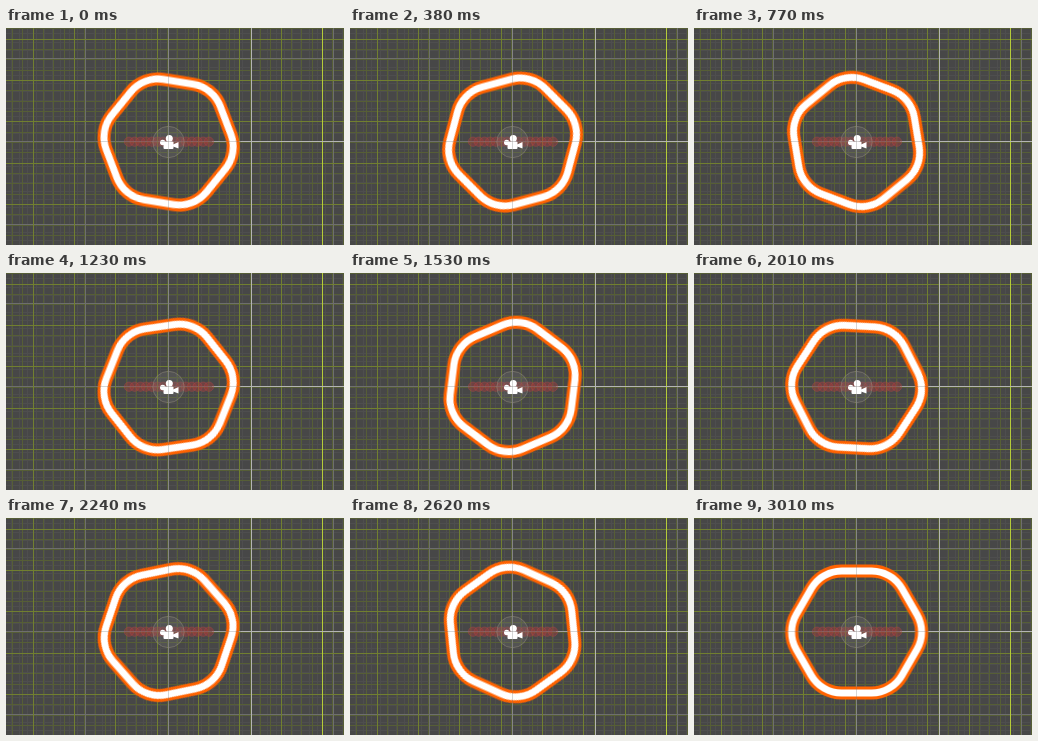
An HTML page for the animation above (3080 ms loop, 338 by 217 pixels).

```html
<!DOCTYPE html>
<html lang="en">
<head>
<meta charset="utf-8">
<title>Rotating hexagon</title>
<style>
html, body { margin: 0; width: 100%; height: 100%; overflow: hidden; background: #474747; }
svg { display: block; width: 338px; height: 217px; }
.ring {
  fill: none;
  /* the small lead keeps every step on a 10 ms clock */
  animation: spin 3080ms steps(40) -7ms infinite;
}
@keyframes spin {
  from { transform: rotate(9.2deg); }
  to { transform: rotate(-184.8deg); }
}
</style>
</head>
<body>
<svg viewBox="0 0 338 217">
  <defs>
    <path id="hex" d="M60.31-17.5A35 35 0 0 1 60.31 17.5L45.31 43.48A35 35 0 0 1 15 60.98H-15A35 35 0 0 1-45.31 43.48L-60.31 17.5A35 35 0 0 1-60.31-17.5L-45.31-43.48A35 35 0 0 1-15-60.98H15A35 35 0 0 1 45.31-43.48Z"/>
  </defs>
  <g id="grid" shape-rendering="crispEdges"></g>
  <g id="bar" fill="#a83c3c" fill-opacity=".42" stroke="#c04848" stroke-opacity=".4" stroke-width=".8"></g>
  <circle cx="162.5" cy="114" r="15.7" fill="#777" fill-opacity=".25" stroke="#99917f" stroke-opacity=".6" stroke-width=".8"/>
  <g fill="#fff">
    <circle cx="163.3" cy="110.5" r="3.5"/>
    <circle cx="156.7" cy="114.5" r="2.7"/>
    <rect x="157.5" y="113.5" width="10" height="7.5" rx="1"/>
    <path d="M167 116.5L172.5 114V120.5L167 118.5Z"/>
  </g>
  <g transform="translate(162.6 114)">
    <g class="ring">
      <use href="#hex" stroke="#ff6200" stroke-width="13"/>
      <use href="#hex" stroke="#fff" stroke-width="7"/>
    </g>
  </g>
  <path d="M162.5 42V186M90 113.5H235" stroke="#777" stroke-opacity=".3"/>
</svg>
<script>
const W = 338, H = 217;
const add = (parent, tag, attrs) => {
  const el = document.createElementNS("http://www.w3.org/2000/svg", tag);
  for (const key in attrs) el.setAttribute(key, attrs[key]);
  parent.append(el);
};
const grid = document.getElementById("grid");
const vline = (x, fill) => add(grid, "rect", { x: Math.round(x), y: 0, width: 1, height: H, fill });
const hline = (y, fill, x = 0) => add(grid, "rect", { x, y: Math.round(y), width: W - x, height: 1, fill });

function lines(step, x0, y0, fill) {
  for (let x = x0 % step; x < W; x += step) vline(x, fill);
  for (let y = y0 % step; y < H; y += step) hline(y, fill);
}

lines(8.27, 162, 113, "#4e4e4e");
lines(10.33, 316, 134.6, "#565e36");
lines(82.7, 162, 113, "#6e6e6e");
lines(41.33, 316, 134.6, "#717f30");
vline(162, "#858585");
vline(245, "#b4b4b4");
vline(316, "#b5cb3a");
hline(113, "#b4b4b4", 206);

const bar = document.getElementById("bar");
for (let i = 0; i < 15; i++) add(bar, "circle", { cx: 123 + i * 5.71, cy: 113.7, r: 4.7 });
</script>
</body>
</html>
```
